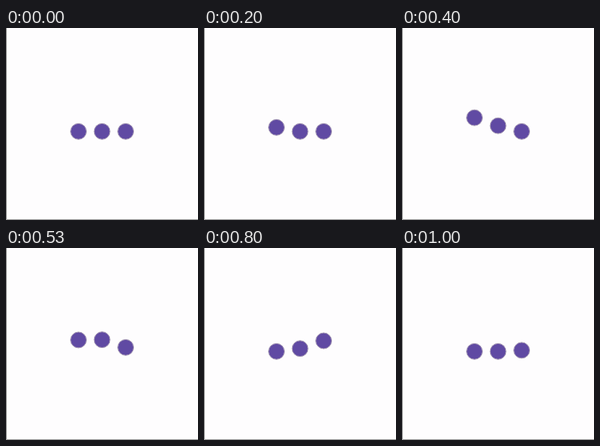
These frames come from a looping animation (240 px wide and 240 px high, 1.07 s). An HTML page:

```html
<!DOCTYPE html>
<html lang="en">
<head>
<meta charset="utf-8">
<title>Loading dots</title>
<style>
  html, body { margin: 0; width: 100%; height: 100%; overflow: hidden; background: #fefdfe; }
  svg { display: block; width: 100%; height: 100%; }
</style>
</head>
<body>
<svg viewBox="0 0 240 240">
  <path d="M.5 0V239.5H240" fill="none" stroke="#999"/>
  <g fill="#604aa3" stroke="#a598b4">
    <circle cx="90.6" cy="129.3" r="9.9"/>
    <circle cx="120.1" cy="129.3" r="9.9"/>
    <circle cx="149.6" cy="129.3" r="9.9"/>
  </g>
</svg>
<script>
const LOOP = 1070, STEP = 200 / 3, REST = 129.3;

// Each dot rises from start to peak, then falls back by end (ms).
const hops = [
  { start: 60, peak: 455, end: 718, height: 18 },
  { start: 260, peak: 545, end: 925, height: 14.7 },
  { start: 460, peak: 665, end: 1075, height: 17.6 }
];
const dots = document.querySelectorAll('circle');

const ease = x => (1 - Math.cos(Math.PI * Math.min(1, Math.max(0, x)))) / 2;

function lift(t, { start, peak, end, height }) {
  const x = t < peak ? (t - start) / (peak - start) : (end - t) / (end - peak);
  return height * ease(x);
}

function draw() {
  // Hold each pose for one step, with step times rounded to 10 ms.
  const ticks = Math.floor(performance.now() % LOOP / 10);
  const t = Math.floor((ticks + 0.35) * 10 / STEP) * STEP;
  dots.forEach((dot, i) => dot.setAttribute('cy', REST - lift(t, hops[i])));
  requestAnimationFrame(draw);
}
draw();
</script>
</body>
</html>
```
